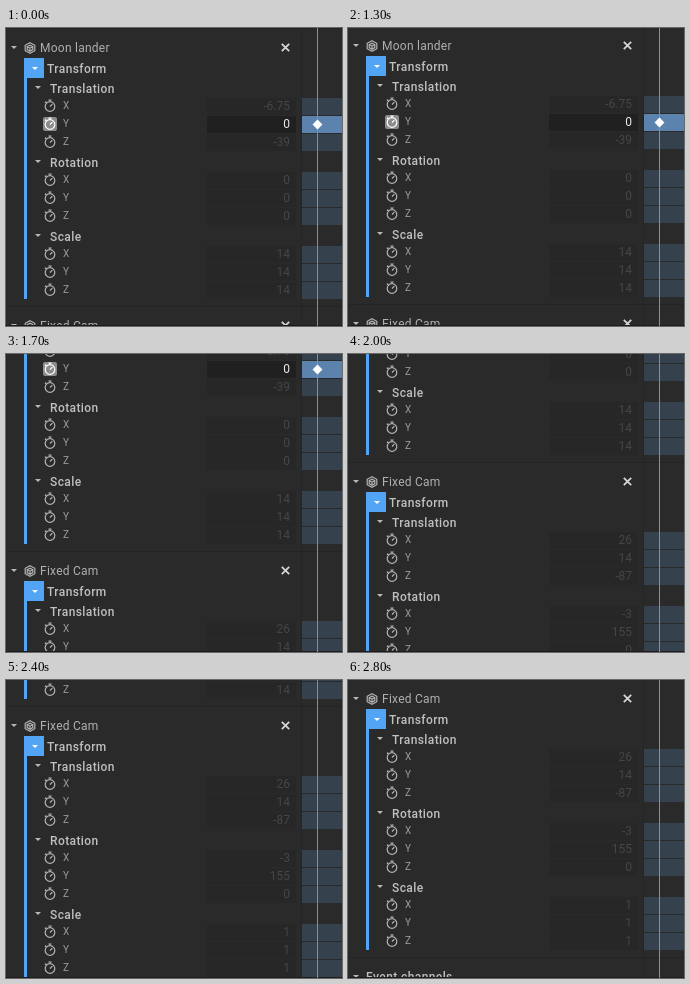
Animation of 336x298 px, one loop 4.5 s. Source, as an HTML page:

```html
<!DOCTYPE html>
<html lang="en">
<head>
<meta charset="utf-8">
<title>Keyframe panel</title>
<style>
html, body { margin: 0; width: 100%; height: 100%; overflow: hidden; background: #2a2a2a; }
#stage { position: relative; width: 336px; height: 298px; overflow: hidden; font: 12px/18px Roboto, sans-serif; color: #b0b0b0; }
#list, #playhead, #stage::before, #stage::after, .card, .card * { position: absolute; }
#list { left: 0; top: 0; width: 336px; }
#stage::before { content: ""; left: 295px; top: 0; width: 1px; height: 298px; background: #252525; }
#stage::after { content: ""; left: 0; top: 297px; width: 336px; height: 1px; background: #1d1a20; }
#playhead { left: 311px; top: 0; width: 1px; height: 298px; background: #8a8e92; z-index: 1; }
.card { left: 0; width: 336px; height: 278px; }
.rule { left: 0; top: 0; width: 336px; height: 1px; background: #242424; }
.text { white-space: nowrap; letter-spacing: .4px; }
.title { letter-spacing: .25px; }
.head { font-weight: 500; color: #c0c0c0; }
.arrow { width: 0; height: 0; border: solid transparent; border-width: 3px 3px 0; border-top-color: #b8b8b8; }
.bar { left: 18px; top: 30px; width: 3px; height: 241px; background: #52a4f4; }
.tab { left: 18px; top: 30px; width: 20px; height: 20px; background: #52a4f4; }
.tab + .arrow { border-top-color: #fff; }
.row { left: 0; width: 336px; height: 17px; line-height: 17px; }
.axis { left: 57px; top: -1px; font-size: 10px; color: #9c9c9c; }
.field { left: 201px; top: 0; width: 83px; height: 17px; padding-right: 6px; background: #272727; color: #464646; text-align: right; }
.track { left: 296px; top: 0; width: 40px; height: 17px; background: #35414d; }
.on .field { background: #202020; color: #e8e8e8; }
.on .track { background: #5c83ad; }
.key { left: 308px; top: 5px; width: 7px; height: 7px; background: #fff; transform: rotate(45deg); z-index: 2; }
.box { left: 37px; top: 1px; width: 14px; height: 14px; border-radius: 2px; background: #8c8c8c; }
svg { fill: none; stroke: #b4b4b4; stroke-width: 1.2; overflow: visible; }
.cross { stroke: #d4d4d4; stroke-width: 1.8; }
.on svg { stroke: #fff; }
</style>
</head>
<body>
<div id="stage"><div id="list"></div><div id="playhead"></div></div>
<script>
const LOOP = 4500, STEP = 100, START = 1300, CARD = 278;
const SCROLL = [2, 11, 28, 52, 81, 111, 141, 170, 196, 218, 237, 252, 264, 272, 277, 279];

const icon = (x, y, size, path, kind = '') =>
  `<svg class="${kind}" style="left:${x}px;top:${y}px" width="${size}" height="${size}"><path d="${path}"/></svg>`;
const arrow = (x, y) => `<i class="arrow" style="left:${x - 3}px;top:${y - 1.5}px"></i>`;
const text = (x, y, label, kind) =>
  `<span class="text ${kind}" style="left:${x}px;top:${y - 9}px">${label}</span>`;

const cube = icon(18, 14, 12, 'M6 .7L10.8 3.3V8.7L6 11.3L1.2 8.7V3.3ZM3.2 4.6L6 6.2L8.8 4.6M6 6.2V9.2M3.2 4.6V7.6L6 9.2L8.8 7.6V4.6L6 3.2Z');
const cross = icon(275, 15, 9, 'M.8 .8L8.2 8.2M8.2 .8L.8 8.2', 'cross');
const watch = icon(38, 1, 12,
  'M1.2 7.5a4.8 4.8 0 1 0 9.6 0a4.8 4.8 0 1 0-9.6 0M6 7.5L8.4 5.1M4.4 1H7.6M6 1V2.7M2.3 2.5L1 3.8');

function row(axis, value, y, on) {
  return `<div class="row ${on ? 'on' : ''}" style="top:${y}px">${on ? '<i class="box"></i>' : ''}${watch}
    <span class="axis">${axis}</span><span class="field">${value}</span>
    <i class="track"></i>${on ? '<i class="key"></i>' : ''}</div>`;
}

function card(index, name, groups, active) {
  let html = `<i class="rule"></i>${arrow(7.5, 19.5)}${cube}${text(34, 19.5, name, 'title')}${cross}
    <i class="bar"></i><i class="tab"></i>${arrow(28.5, 40)}${text(41, 40.5, 'Transform', 'head')}`;
  Object.entries(groups).forEach(([label, values], g) => {
    const y = 60.5 + g * 74;
    html += arrow(31.5, y - 1) + text(44, y, label, 'head');
    values.forEach((v, i) => html += row('XYZ'[i], v, y + 9.5 + i * 18, active === label + i));
  });
  return `<div class="card" style="top:${index * CARD}px">${html}</div>`;
}

const list = document.getElementById('list');
list.innerHTML =
  card(0, 'Moon lander', { Translation: [-6.75, 0, -39], Rotation: [0, 0, 0], Scale: [14, 14, 14] }, 'Translation1') +
  card(1, 'Fixed Cam', { Translation: [26, 14, -87], Rotation: [-3, 155, 0], Scale: [1, 1, 1] }) +
  `<div class="card" style="top:${2 * CARD}px"><i class="rule"></i>${arrow(7.5, 19.5)}${text(18, 19.5, 'Event channels', 'head')}</div>`;

function draw(now) {
  const i = Math.floor((now % LOOP - START) / STEP);
  const y = i < 0 ? 0 : SCROLL[Math.min(i, SCROLL.length - 1)];
  // Offset rather than transform, so the key can stack above the playhead.
  list.style.top = `${-y}px`;
  requestAnimationFrame(draw);
}
draw(performance.now());
</script>
</body>
</html>
```
